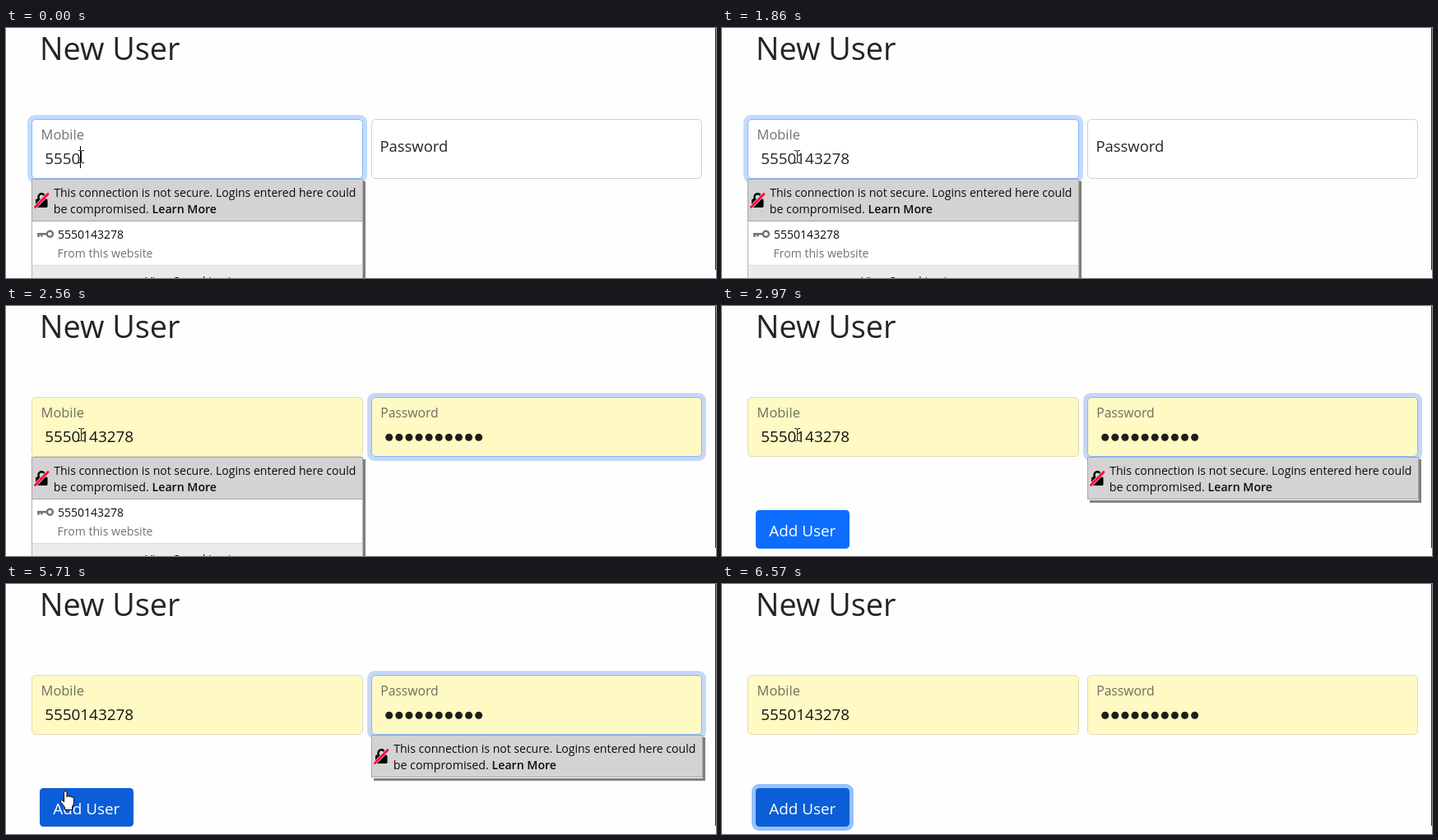
Animation, 863 px wide and 305 px high, one loop 7.69 s. Source, as an HTML page:

```html
<!DOCTYPE html>
<html lang="en">
<head>
<meta charset="utf-8">
<title>New User</title>
<style>
  html, body { margin: 0; width: 100%; height: 100%; overflow: hidden; background: #fefefe; }
  svg { display: block; width: 863px; height: 305px; font-family: "Open Sans", "Noto Sans", sans-serif; fill: #212529; }
  .field { fill: #fff; stroke: #ced4da; }
  .filled .field { fill: #fff9c4; stroke: #e0dbb4; }
  .filled #number { fill: #111; }
  .field.focus { stroke: #86b7fe; }
  .ring { fill: #c2dbfe; }
  .filled .ring { fill: #c6d7f8; }
  .label { opacity: .65; }
  .popup { font-size: 14.05px; fill: #0c0c0d; }
  .panel { filter: drop-shadow(3px 3px .7px rgba(0, 0, 0, .5)); }
  .bold { font-weight: 600; }
  .hide { display: none; }
</style>
</head>
<body>
<svg id="stage" viewBox="0 0 863 305">
  <rect width="863" height="305" fill="#fefefe"/>
  <rect x="862" width="1" height="295" fill="#2b2b2b"/>
  <text x="41" y="39" font-size="37.8">New User</text>

  <rect id="ringM" class="ring" x="26" y="106" width="413" height="83" rx="9"/>
  <rect id="ringP" class="ring" x="439" y="106" width="412" height="83" rx="9"/>
  <rect id="fieldM" class="field" x="31.5" y="111.5" width="402" height="72" rx="4.5"/>
  <rect id="fieldP" class="field" x="444.5" y="111.5" width="401" height="72" rx="4.5"/>
  <text class="label" x="42.6" y="136" font-size="16.4">Mobile</text>
  <text id="number" x="47.2" y="166" font-size="18.88"></text>
  <text id="labelBig" x="454.5" y="151" font-size="18.4">Password</text>
  <text id="labelSmall" class="label" x="455.2" y="136" font-size="15.7">Password</text>
  <g id="dots" fill="#1f1e18"></g>

  <rect id="ringB" x="36" y="244" width="124" height="57" rx="9" fill="#98c1fe"/>
  <rect id="button" x="41" y="249" width="114" height="47" rx="4.5"/>
  <text x="57.2" y="281" font-size="18.9" fill="#fff">Add User</text>

  <g id="popup" class="popup">
    <rect id="panel" class="panel" x="31" y="184" width="403" fill="#fff"/>
    <rect x="31.5" y="184.5" width="402" height="51" fill="#d3d3d3" stroke="#a6a6a6"/>
    <path d="M39.5 210v-4a3.8 3.8 0 0 1 7.6 0v4" fill="none" stroke="#000" stroke-width="2.4"/>
    <rect x="36" y="208.5" width="14.5" height="10.5" rx="1.6" fill="#000"/>
    <path d="M35.5 218.5L51 202.5" stroke="#d3d3d3" stroke-width="4.4"/>
    <path d="M35.5 218.5L51 202.5" stroke="#ff0039" stroke-width="2.7" stroke-linecap="round"/>
    <text x="58.2" y="206">This connection is not secure. Logins entered here could</text>
    <text x="57.7" y="226" font-size="14.25">be compromised.</text>
    <text class="bold" x="177.6" y="226" font-size="14.15">Learn More</text>
    <g id="rows">
      <g fill="none" stroke="#737373" stroke-width="2.4">
        <circle cx="53.4" cy="251.3" r="3.6"/>
        <path d="M49.8 251.3H38M39.5 251v4M43.3 251v3.4"/>
      </g>
      <text id="saved" x="62.9" y="257" font-size="14"></text>
      <text x="62.6" y="280" fill="#737373">From this website</text>
      <rect x="32" y="289" width="401" height="16" fill="#ebebeb"/>
      <path d="M32 289.5H433" stroke="#dcdcdc"/>
      <text x="169.5" y="313.5">View Saved Logins</text>
      <path d="M31.5 236V305M433.5 236V305" stroke="#b4b4b4"/>
    </g>
  </g>

  <rect id="caret" y="144" width="1" height="27" fill="#000"/>
  <g id="cursor">
    <path id="beam" d="M-3 -7.5H-1Q.5 -7.5 .5 -6V6Q.5 7.5 -1 7.5H-3M4 -7.5H2Q.5 -7.5 .5 -6V6Q.5 7.5 2 7.5H4" fill="none" stroke="#222"/>
    <path id="arrow" d="M.5 .5V16L4 12.7 6.5 18.3 9 17.2 6.6 11.7H11.5Z" fill="#fff" stroke="#000"/>
    <path id="hand" d="M-1.5 14V2.2Q-1.5 .5 .2 .5 2 .5 2 2.2V8Q2 6.3 3.6 6.3 5.2 6.3 5.2 8 5.2 6.9 6.7 6.9 8.2 6.9 8.2 8.8 8.2 7.9 9.3 7.9 10.5 7.9 10.5 9.8V15.5L8.5 20V23.5H-.5V20.5L-5.5 13.8Q-6 11.8 -4.5 11.5 -3 11.4 -1.5 14Z" fill="#fff" stroke="#000"/>
  </g>
</svg>
<script>
const LOOP = 7690, NUMBER = "5550143278", PITCH = 10.8, END = 580;
const $ = id => document.getElementById(id);
const show = (id, on) => $(id).classList.toggle("hide", !on);
const after = n => Math.round(47 + PITCH * n);
const type = n => ({ digits: n, caret: after(n) });
const move = (kind, x, y) => ({ cursor: [kind, x, y] });

// Each step overrides part of the state from its time (ms) on.
const steps = [
  [0, { ...type(4), filled: false, focus: "M", popup: "M", button: "#0d6efd", ...move("beam", 91, 157) }],
  [250, { caret: 0 }],
  [750, { caret: after(4) }],
  [870, type(5)],
  [990, type(6)],
  [1110, type(7)],
  [1360, type(8)],
  [1610, type(9)],
  [1860, { digits: 10, caret: 0 }],
  [2010, { filled: true }],
  [2160, { focus: "P", caret: END }],
  [2560, { caret: 0 }],
  [2970, { popup: "P" }],
  [3090, { caret: END }],
  [3590, { caret: 0 }],
  [3960, move("arrow", 46, 187)],
  [4080, { caret: END, ...move("arrow", 15, 214) }],
  [4200, move("arrow", 29, 238)],
  [4320, move("arrow", 71, 249)],
  [4470, { button: "#0b5ed7", ...move("hand", 72, 252) }],
  [4710, { caret: 0 }],
  [5210, { caret: END }],
  [5710, { caret: 0 }],
  [6210, { caret: END }],
  [6330, { caret: 0, focus: "B", popup: "" }],
  [6570, move("", 0, 0)]
];

$("saved").textContent = NUMBER;
for (let i = 0; i < 10; i++) {
  const dot = document.createElementNS($("stage").namespaceURI, "circle");
  dot.setAttribute("cx", 465.7 + 12.1 * i);
  dot.setAttribute("cy", 160.2);
  dot.setAttribute("r", 4.5);
  $("dots").append(dot);
}

function draw(s) {
  $("stage").classList.toggle("filled", s.filled);
  $("number").textContent = NUMBER.slice(0, s.digits);
  show("dots", s.filled);
  show("labelSmall", s.filled);
  show("labelBig", !s.filled);
  for (const k of "MPB") show("ring" + k, s.focus === k);
  for (const k of "MP") $("field" + k).classList.toggle("focus", s.focus === k);
  $("button").setAttribute("fill", s.button);

  const onMobile = s.popup === "M";
  show("popup", s.popup);
  show("rows", onMobile);
  $("popup").setAttribute("transform", `translate(${onMobile ? 0 : 413})`);
  $("panel").setAttribute("height", onMobile ? 150 : 53);

  show("caret", s.caret);
  $("caret").setAttribute("x", s.caret);
  const [kind, x, y] = s.cursor;
  for (const k of ["beam", "arrow", "hand"]) show(k, kind === k);
  $("cursor").setAttribute("transform", `translate(${x} ${y})`);
}

let last = -1;
function tick() {
  const t = performance.now() % LOOP;
  const count = steps.filter(([at]) => at <= t).length;
  if (count !== last) {
    last = count;
    draw(Object.assign({}, ...steps.slice(0, count).map(([, change]) => change)));
  }
  requestAnimationFrame(tick);
}
tick();
</script>
</body>
</html>
```
